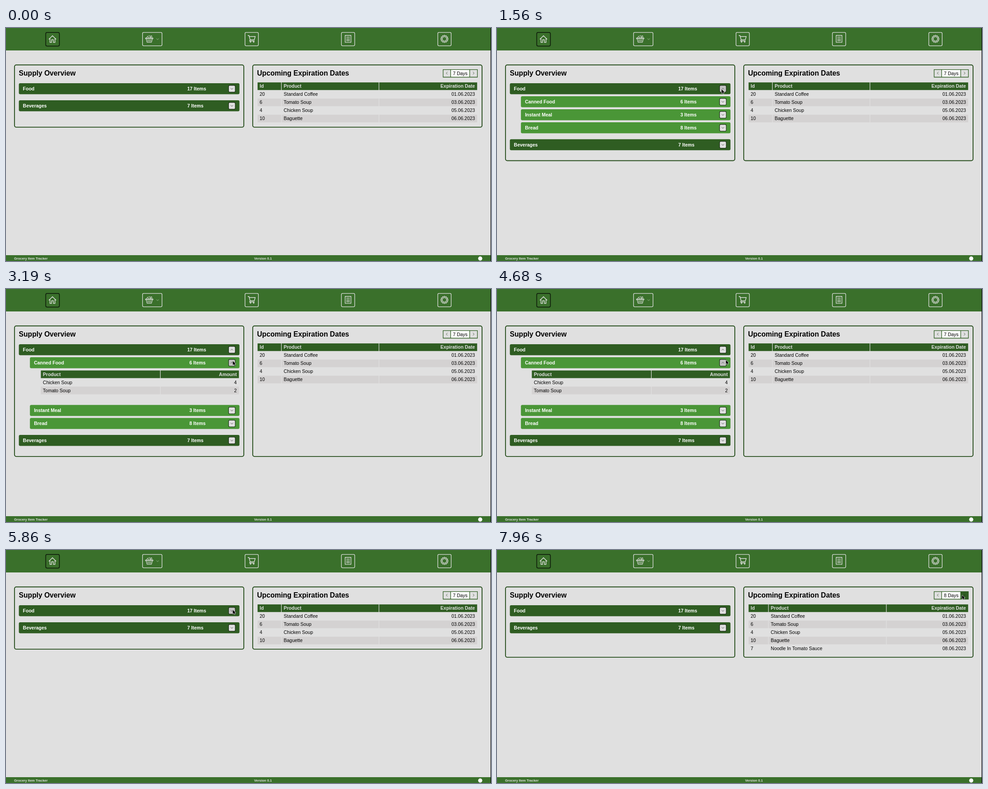
Recreate the animation shown at these times as an HTML page with a canvas. Size 1079 by 519 pixels, loop 8 s.

```html
<!DOCTYPE html>
<html lang="en">
<head>
<meta charset="utf-8">
<title>Grocery Item Tracker</title>
<style>
html, body { margin: 0; width: 100%; height: 100%; overflow: hidden; background: #e0e0e0; }
canvas { display: block; width: 1079px; height: 519px; }
</style>
</head>
<body>
<canvas id="stage" width="1079" height="519"></canvas>
<script>
const ctx = document.getElementById('stage').getContext('2d');
const LOOP = 8000;
const PAGE = '#e0e0e0', BAR = '#3a702b', DARK = '#2f5d22', LIGHT = '#4a9637',
      EDGE = '#264d1c', STRIPE = '#d4d2d2', HOVER = '#c3c3c3';
const FONT = '"Liberation Sans", Arial, sans-serif';
const SIZE = 10.47;

// Pointer runs: start, end, number of steps, way points
const RUNS = [
  [440, 530, 2, [[631, 260], [624, 260], [617, 260]]],
  [690, 850, 3, [[617, 260], [521, 183]]],
  [1010, 1330, 5, [[521, 183], [504, 147], [499, 136]]],
  [2230, 2780, 8, [[499, 136], [501, 148], [504, 160]]],
  [4680, 5460, 11, [[504, 160], [513, 156], [518, 148], [513, 139], [505, 134]]],
  [5540, 5540, 1, [[505, 134], [504, 133]]],
  [6520, 6760, 4, [[504, 133], [564, 120]]],
  [6920, 7320, 6, [[564, 120], [1013, 81]]],
  [7490, 7960, 7, [[1013, 81], [1034, 100]]]
];

const EXPIRING = [
  ['20', 'Standard Coffee', '01.06.2023'],
  ['6', 'Tomato Soup', '03.06.2023'],
  ['4', 'Chicken Soup', '05.06.2023'],
  ['10', 'Baguette', '06.06.2023'],
  ['7', 'Noodle In Tomato Sauce', '08.06.2023']
];

function along(points, u) {
  const f = u * (points.length - 1);
  const i = Math.min(Math.floor(f), points.length - 2), r = f - i;
  return points[i].map((v, a) => v + (points[i + 1][a] - v) * r);
}

function pointerAt(t) {
  const run = RUNS.filter(r => t >= r[0]).pop();
  if (!run) return null;
  const [start, end, n, points] = run;
  const k = t >= end ? n : 1 + Math.floor((t - start) / (end - start) * (n - 1) + 1e-6);
  const u = k / n;
  return along(points, u * (2 - u) * 0.5 + u * 0.5);
}

function text(s, x, y, { size = SIZE, bold = false, color = '#000', align = 'left' } = {}) {
  ctx.font = (bold ? 'bold ' : '') + size + 'px ' + FONT;
  ctx.fillStyle = color;
  ctx.textAlign = align;
  ctx.fillText(s, x, y);
}

function rect(x, y, w, h, color) {
  ctx.fillStyle = color;
  ctx.fillRect(x, y, w, h);
}

function box(x, y, w, h, r, fill, stroke, lw = 1.3) {
  ctx.beginPath();
  ctx.roundRect(x, y, w, h, r);
  if (fill) { ctx.fillStyle = fill; ctx.fill(); }
  if (stroke) { ctx.strokeStyle = stroke; ctx.lineWidth = lw; ctx.stroke(); }
}

function path(d, color = PAGE, lw = 1.3) {
  ctx.strokeStyle = color;
  ctx.lineWidth = lw;
  ctx.stroke(new Path2D(d));
}

function ring(x, y, r, lw = 1.2) {
  ctx.beginPath();
  ctx.arc(x, y, r, 0, 7);
  ctx.strokeStyle = PAGE;
  ctx.lineWidth = lw;
  ctx.stroke();
}

function gear(x, y) {
  const teeth = 12;
  ctx.beginPath();
  for (let i = 0; i < teeth * 4; i++) {
    const a = (i - 0.5) / (teeth * 4) * Math.PI * 2;
    const r = i % 4 < 2 ? 8.2 : 6.8;
    ctx.lineTo(x + r * Math.sin(a), y - r * Math.cos(a));
  }
  ctx.closePath();
  ctx.strokeStyle = PAGE;
  ctx.lineWidth = 1.2;
  ctx.stroke();
  ring(x, y, 4.9, 1.3);
}

function navigation() {
  rect(0, 0, 1079, 50, BAR);
  box(88.4, 9.9, 30.4, 30.4, 3, null, '#10200c', 1.7);
  for (const [x, w] of [[303.7, 43.4], [531.7, 29.8], [746.2, 29.6], [960.6, 29.8]])
    box(x, 9.8, w, 29.8, 2.5, null, PAGE);

  path('M95.2 25.2L103.4 17.2L111.6 25.2M97.8 23.5V32H101.4V26.3H105.4V32H109V23.5', PAGE, 1.4);

  path('M310.3 22.3H327V24H310.3ZM311.8 24L313.8 31.6H323.6L325.6 24', PAGE, 1.2);
  path('M315.4 25.5L316 30M318.7 25.5V30M322 25.5L321.4 30', PAGE, 1.2);
  path('M312.3 22L315 17.8L317.5 22M317 18.5L318.6 16.5L320.5 19V22M322 16.8V22M322 17.5H324.5V22', PAGE, 1);
  path('M334.6 23.4L337.3 26L340 23.4', '#9bb894', 1);

  path('M537.8 16.7H540.6L543.1 26.3H552.3L554.5 19H541.3M543.1 26.3L542 28.8H553', PAGE, 1.4);
  ring(544, 30.9, 1);
  ring(551, 30.9, 1);

  path('M754.5 16.5H767.5V31.8H754.5Z', PAGE, 1.3);
  path('M757 20H765M757 22.8H765M757 25.6H765M757 28.4H765', PAGE, 1.1);
  gear(975.4, 24.3);
}

function footer() {
  const style = { size: 7.46, bold: true, color: PAGE };
  rect(0, 506, 1079, 13, BAR);
  text('Grocery Item Tracker', 18, 515.7, style);
  text('Version 0.1', 552, 515.7, style);
  ctx.beginPath();
  ctx.arc(1055, 513.4, 4.6, 0, 7);
  ctx.fillStyle = '#fff';
  ctx.fill();
}

function inside(p, x, y, w, h) {
  return p && p[0] >= x && p[0] < x + w && p[1] >= y && p[1] < y + h;
}

function chevron(x, y, open) {
  const d = open ? -1.4 : 1.4;
  path(`M${x - 2.8} ${y - d}L${x} ${y + d}L${x + 2.8} ${y - d}`, '#555', 1);
}

function group(name, count, y, sub, open, pointer) {
  const x = sub ? 53.2 : 28.6;
  box(x, y, 519.4 - x, 24.5, 3, sub ? LIGHT : DARK);
  const style = { bold: true, color: '#fff' };
  text(name, x + 9, y + 15.9, style);
  text(count + ' Items', sub ? 408 : 403.3, y + 15.9, style);
  const hot = inside(pointer, 495, y + 5, 15.5, 15.5);
  box(495.2, y + 4.9, 14.8, 14.8, 2.5, hot ? HOVER : PAGE, '#1c2a18', 1.1);
  chevron(502.5, y + 12.3, open);
}

// edges: column borders; the last column is right-aligned
function table(edges, y, head, rows) {
  const last = head.length - 1;
  const line = (cells, top, h, fill, style) => cells.forEach((s, i) => {
    const x = edges[i], w = edges[i + 1] - x - 1.2;
    if (fill) rect(x, top, w, h, fill);
    const right = i === last;
    text(s, right ? x + w - 4.8 : x + 4.6, top + 12.2, { ...style, align: right ? 'right' : 'left' });
  });
  line(head, y, 17, DARK, { bold: true, color: PAGE });
  rows.forEach((row, i) => line(row, y + 18 * (i + 1), 17, i % 2 ? STRIPE : null, {}));
}

function supply(food, canned, pointer) {
  text('Supply Overview', 28.5, 106.3, { size: 15.7, bold: true });
  group('Food', 17, 123, false, food, pointer);
  const shift = canned ? 77.3 : 0;
  if (food) {
    group('Canned Food', 6, 152, true, canned, pointer);
    if (canned)
      table([77.5, 344, 519.4], 181.5, ['Product', 'Amount'], [['Chicken Soup', '4'], ['Tomato Soup', '2']]);
    group('Instant Meal', 3, 181 + shift, true, false, pointer);
    group('Bread', 8, 210 + shift, true, false, pointer);
  }
  group('Beverages', 7, food ? 247.8 + shift : 161, false, false, pointer);
}

function expiry(days, pointer) {
  text('Upcoming Expiration Dates', 558.5, 106.3, { size: 15.7, bold: true });
  const more = inside(pointer, 1031, 92, 18, 18);
  rect(989, 92.5, 42.5, 17, '#fff');
  if (more) rect(1031.5, 92.5, 17, 17, DARK);
  path('M972.5 92.7H1048.7V109.5H972.5ZM989.3 92.7V109.5M1031.6 92.7V109.5', DARK, 1.3);
  path('M982.1 97.8L979.4 100.6L982.1 103.4', '#4c5f46', 1);
  path('M1038.8 97.8L1041.5 100.6L1038.8 103.4', more ? '#1c3a14' : '#4c5f46', 1);
  text(days + ' Days', 1010.5, 104.6, { align: 'center' });
  const wide = days > 7;
  table([559.7, wide ? 604.5 : 613.2, wide ? 866.8 : 830.3, 1049.4], 121.2,
    ['Id', 'Product', 'Expiration Date'], EXPIRING.slice(0, wide ? 5 : 4));
}

function cursor([x, y]) {
  ctx.save();
  ctx.translate(x, y);
  const arrow = new Path2D('M.6 .6V9.2L2.6 7.4L4 10.6L5.6 9.9L4.2 6.8H7Z');
  ctx.lineJoin = 'round';
  ctx.strokeStyle = '#e8e8e8';
  ctx.lineWidth = 1.2;
  ctx.stroke(arrow);
  ctx.fillStyle = '#000';
  ctx.fill(arrow);
  ctx.restore();
}

function draw(t) {
  const pointer = pointerAt(t);
  const food = t >= 1560 && t < 5860;
  const canned = t >= 3190 && t < 5860;
  const days = t >= 7960 ? 8 : 7;
  const bottom = canned ? 374 : food ? 296.4 : days > 7 ? 239.8 : 221.8;

  rect(0, 0, 1079, 519, PAGE);
  navigation();
  for (const x of [18.9, 548.9]) box(x, 82.2, 510.2, bottom - 83.1, 4, null, EDGE, 1.9);
  supply(food, canned, pointer);
  expiry(days, pointer);
  footer();
  rect(1078, 0, 1, 519, '#000');
  if (pointer) cursor(pointer);
}

const began = performance.now();
function tick() {
  draw((performance.now() - began) % LOOP);
  requestAnimationFrame(tick);
}
tick();
</script>
</body>
</html>
```
